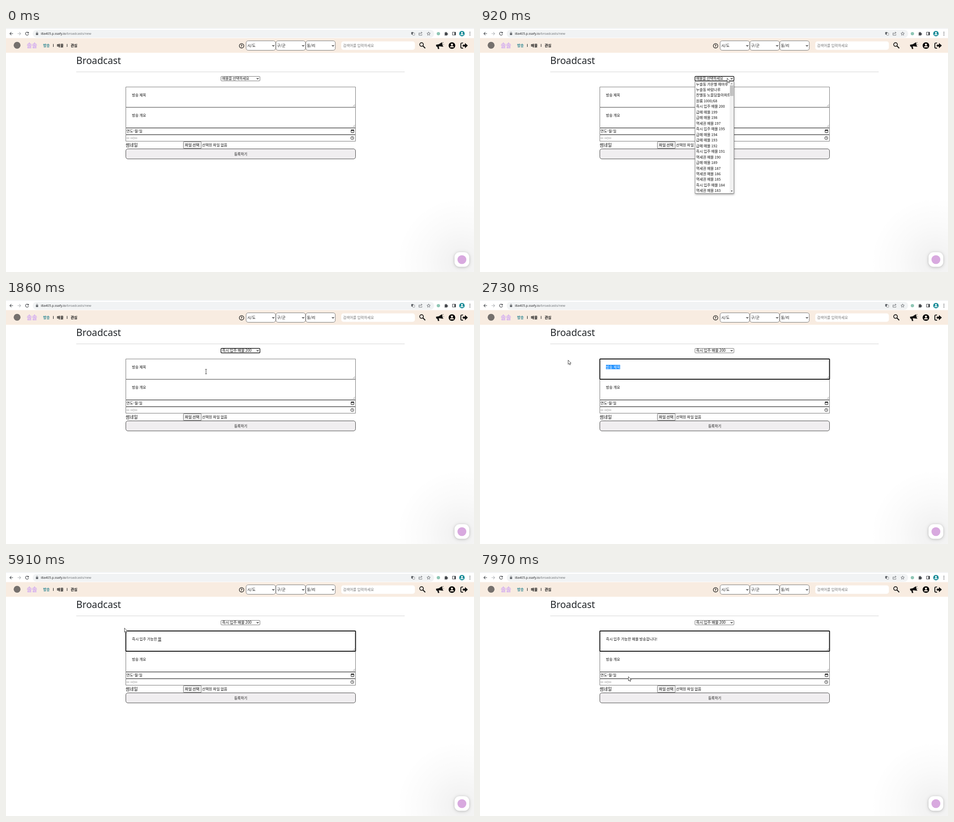
These frames come from a looping animation (1033 px wide and 542 px high, 8000 ms). An HTML page with a canvas:

```html
<!DOCTYPE html>
<html lang="ko">
<head>
<meta charset="utf-8">
<style>
html, body { margin: 0; width: 100%; height: 100%; overflow: hidden; background: #fff; }
canvas { display: block; width: 1033px; height: 542px; }
</style>
</head>
<body>
<canvas id="stage"></canvas>
<script>
const W = 1033, H = 542, LOOP = 8000, TICK = 66.4;
const KR = '"Noto Sans CJK KR", "Noto Sans CJK", sans-serif';
const UI = '"Open Sans", "Noto Sans", sans-serif';
const INK = '#111', BORDER = '#767676', BLUE = '#1e90ff';

const stage = document.getElementById('stage');
const ctx = stage.getContext('2d');
const dpr = window.devicePixelRatio || 1;
stage.width = W * dpr;
stage.height = H * dpr;

// Cursor tip by tick: [tick, x, y]
const PATH = [
  [1, 848, 418], [2, 728, 308], [3, 609, 219], [5, 598, 160], [9, 600, 112],
  [11, 600, 112], [12, 560, 111], [13, 545, 111], [18, 545, 111], [19, 518, 136],
  [20, 511, 159], [21, 508, 168], [22, 507, 174], [26, 507, 174], [27, 478, 166],
  [29, 405, 152], [31, 371, 149], [32, 345, 149], [33, 318, 149], [35, 277, 146],
  [37, 226, 138], [39, 194, 133], [41, 194, 133], [42, 230, 127], [43, 261, 124],
  [114, 261, 124], [115, 220, 140], [116, 193, 178], [117, 235, 232], [118, 290, 256],
  [119, 318, 246], [120, 327, 232]
];

// Title typing: [tick, text]; a trailing ~ marks a syllable still being composed
const TYPING = [
  [47, 'ㅈ~'], [50, '즈~'], [52, '즉~'], [55, '즈~'], [57, 'ㅈ~'], [58, '지~'], [60, '직~'], [62, '즉~'],
  [64, '즉ㅅ~'], [65, '즉시~'], [67, '즉시 '],
  [70, '즉시 ㅇ~'], [71, '즉시 이~'], [72, '즉시 입~'], [74, '즉시 입ㅈ~'], [75, '즉시 입주~'],
  [77, '즉시 입주 '], [79, '즉시 입주 가~'],
  ...steps(82, '즉시 입주 가', ['느~', '능~', '능ㅎ~', '능하~', '능한~', '능한 ㅁ~', '능한 매~', '능한 맴~']),
  [91, '즉시 입주 가능한 매무~'], [92, '즉시 입주 가능한 매물~'], [93, '즉시 입주 가능한 매물 '],
  ...steps(94, '즉시 입주 가능한 매물 ', ['ㅂ~', '바~', '방~', '방ㅅ~', '방소~', '방송~', '방송ㅎ~', '방송하~', '방송합~']),
  [104, '즉시 입주 가능한 매물 방송합ㄴ~'], [106, '즉시 입주 가능한 매물 방송합니~'],
  [107, '즉시 입주 가능한 매물 방송합닏~'], [108, '즉시 입주 가능한 매물 방송합니다~'],
  [111, '즉시 입주 가능한 매물 방송합니다!']
];

const ITEMS = [
  '누솔동 가온별 채마루', '누솔동 바람나루', '찬별동 노을담뜰아파트', '원룸 1000/68',
  ...['즉200', '급199', '급198', '역197', '즉195', '급194', '급193', '급192', '즉191', '역190',
    '급189', '역187', '역186', '역185', '즉184', '역183'].map(s =>
    ({ 즉: '즉시 입주', 급: '급매', 역: '역세권' })[s[0]] + ' 매물 ' + s.slice(1))
];

function steps(from, base, ends) {
  return ends.map((e, i) => [from + i, base + e]);
}

function text(s, x, y, size = 8.1, color = INK, weight = 500, align = 'left', family = KR) {
  ctx.font = `${weight} ${size}px ${family}`;
  ctx.textAlign = align;
  ctx.fillStyle = color;
  ctx.fillText(s, x, y);
  return ctx.measureText(s).width;
}

function box(x, y, w, h, r, fill, stroke, line = 1) {
  ctx.beginPath();
  ctx.roundRect(x, y, w, h, r);
  if (fill) { ctx.fillStyle = fill; ctx.fill(); }
  if (stroke) { ctx.strokeStyle = stroke; ctx.lineWidth = line; ctx.stroke(); }
}

function rect(x, y, w, h, fill) {
  ctx.fillStyle = fill;
  ctx.fillRect(x, y, w, h);
}

function disc(x, y, r, fill) {
  ctx.beginPath();
  ctx.arc(x, y, r, 0, Math.PI * 2);
  ctx.fillStyle = fill;
  ctx.fill();
}

function ring(x, y, r, color, line) {
  ctx.beginPath();
  ctx.arc(x, y, r, 0, Math.PI * 2);
  ctx.strokeStyle = color;
  ctx.lineWidth = line;
  ctx.stroke();
}

function stroke(d, color = INK, line = 1) {
  ctx.strokeStyle = color;
  ctx.lineWidth = line;
  ctx.stroke(new Path2D(d));
}

function fill(d, color = INK) {
  ctx.fillStyle = color;
  ctx.fill(new Path2D(d));
}

function chevron(x, y) {
  stroke(`M${x - 2.2} ${y - 1.1}l2.2 2.2 2.2-2.2`, INK, 1.2);
}

function person(x, y, r, back, front) {
  disc(x, y, r, back);
  disc(x, y - r * .28, r * .33, front);
  fill(`M${x - r * .6} ${y + r * .55}q0-${r * .42} ${r * .6}-${r * .42}t${r * .6} ${r * .42}z`, front);
}

function browserBar() {
  const gray = '#5f6368';
  rect(0, 0, W, 1, '#e4e7ea');
  box(59, 4, 886, 17.5, 8.7, '#f1f3f4');
  stroke('M15.5 12.5H8.5M11.8 9.2L8.5 12.5l3.3 3.3', '#4a4d51', 1.2);
  stroke('M25.5 12.5h7M29.2 9.2l3.3 3.3-3.3 3.3', '#b4b7ba', 1.2);
  stroke('M49 10.3A3.4 3.4 0 1 0 49.8 13.3M49.8 8.8v2.4h-2.6', '#4a4d51', 1.2);
  box(66, 11.6, 5, 4, .6, gray);
  stroke('M67 11.8v-1.3a1.5 1.5 0 0 1 3 0v1.3', gray, .9);
  const w = text('i8a405.p.ssafy.io', 77, 15.2, 7.2, '#202124', 400, 'left', UI);
  text('/broadcasts/new', 77 + w, 15.2, 7.2, '#6a6e72', 400, 'left', UI);

  box(894.5, 9, 4.6, 5.4, .6, gray);
  box(897.8, 11, 4.2, 5.2, .6, '#fff', gray, .7);
  stroke('M913.5 11h-2v5h6.5v-2M913.5 13.5q.3-3 4.5-3M916.2 8.5l2.3 2-2.3 2', gray, .9);
  stroke('M932.8 8.8l1.1 2.5 2.7.2-2 1.8.6 2.7-2.4-1.4-2.4 1.4.6-2.7-2-1.8 2.7-.2z', gray, .9);
  disc(954.4, 12.6, 3.7, '#8fc6b5');
  fill('M968.2 10.2h2v-.6a1 1 0 0 1 2 0v.6h2v2h.5a1.1 1.1 0 0 1 0 2.2h-.5v2h-6v-2.2a1 1 0 0 0 0-1.8z', '#44474b');
  box(985.5, 9.2, 7, 6.6, .5, null, '#44474b', 1.1);
  rect(989.6, 9.2, 3, 6.6, '#44474b');
  person(1006.4, 12.5, 6, '#158a96', '#fff');
  [9.4, 12.6, 15.8].forEach(y => disc(1024, y, .9, '#44474b'));
}

function siteHeader() {
  rect(0, 22.5, W, 32.5, '#f8ece1');
  disc(24.5, 38.3, 7.6, '#75706d');
  text('솔솔', 45.7, 43, 12.6, '#d2aaf0', 900);
  text('방송', 82, 41.7, 8, '#23818e', 700);
  text('매물', 112.3, 41.7, 8, INK, 700);
  text('관심', 142.7, 41.7, 8, INK, 700);
  rect(104, 35.5, 1, 6.5, INK);
  rect(134.4, 35.5, 1, 6.5, INK);

  ring(520, 39.6, 5, INK, 1.2);
  text('?', 520, 42.6, 8, INK, 700, 'center', UI);
  ['시/도', '구/군', '동/리'].forEach((s, i) => {
    const x = 530 + i * 65.9;
    box(x, 28.5, 65, 21, 4.5, '#fff', '#777');
    text(s, x + 2.4, 41.8, 8.3);
    chevron(x + 60, 39.2);
  });
  box(740, 29.7, 162.5, 18.8, 5, '#fff');
  text('검색어를 입력하세요', 744, 42, 8, '#757575');

  ring(917.2, 36.7, 4, INK, 1.7);
  stroke('M920.2 39.7l5.2 5.3', INK, 2.1);
  fill('M949 37.2l6.5-1.2 6.8-4.5 2.2 10.3-7.4-1.2-2 .5 1.4 5.1-3 .6-1.6-5.3-2 .1z');
  stroke('M964.2 33.5l.8-2M965.3 36.8l1.2-.2M964.5 40l1.2 1', INK, .9);
  person(984.3, 39, 7.3, '#000', '#f8ece1');
  stroke('M1009 33.4h-3a2 2 0 0 0-2 2v7.4a2 2 0 0 0 2 2h3', INK, 1.9);
  fill('M1008 37h5v-3.8l6.4 5.9-6.4 5.9v-3.8h-5z');
}

function grip(y) {
  stroke(`M765.8 ${y}l4.4-4.4M768.4 ${y}l1.8-1.8`, '#777', .8);
}

function form(n) {
  const open = n >= 14 && n < 26, chosen = n >= 26, focused = n >= 33;
  text('Broadcast', 155, 80.3, 21, '#212529', 500, 'left', '"Noto Sans", sans-serif');
  rect(155, 97, 725, 1, '#d3d3d3');

  const active = n >= 13 && !focused;
  box(474.5, 107.5, 86, 10, 1.5, '#fff', active ? '#111' : BORDER, active ? 1.4 : 1);
  text(chosen ? ITEMS[4] : '매물을 선택하세요', 477, 115.1, chosen ? 8.3 : 7.9);
  chevron(555.5, 112.4);

  box(264.5, 176.5, 507, 45, 0, '#fff', BORDER);
  text('방송 개요', 278, 197.2, 8);
  grip(219.8);
  box(264.5, 131, 507, 45, focused ? 1 : 0, '#fff', focused ? '#111' : BORDER, focused ? 2 : 1);
  grip(174.3);
  title(n);

  box(264.5, 222.5, 507, 14, 0, '#fff', BORDER);
  box(264.5, 237.5, 507, 14, 0, '#fff', BORDER);
  text('연도-월-일', 265.7, 232.2, 8.1);
  text('-- --:--', 266, 247, 9.3);
  box(761.8, 226.7, 6, 5.8, .5, null, INK, 1);
  rect(761.5, 226.3, 6.6, 1.9, INK);
  rect(762.8, 225.3, 1, 1.5, INK);
  rect(766, 225.3, 1, 1.5, INK);
  ring(764.3, 244.4, 3.4, INK, .9);
  stroke('M764.3 242.3v2.2l1.4 1', INK, .9);

  text('썸네일', 264, 263.6, 9.8);
  box(391.5, 252.5, 39.5, 15, 1, '#efefef', BORDER);
  text('파일 선택', 395, 262.8, 8.1);
  text('선택된 파일 없음', 432.8, 262.8, 8.1);
  box(264.5, 268.5, 507, 22.3, 4.5, n === 2 ? '#e3e1e3' : '#f0eef0', '#444');
  text('등록하기', 518, 282.7, 7.8, INK, 500, 'center');
  if (open) list(n);
}

function title(n) {
  const x = 278, y = 152.2;
  if (n < 47) {
    const w = text('방송 제목', x, y, 8);
    const left = n < 34 ? w : Math.max(0, Math.min(w, pointer(n)[0] - x));
    if (left < w) {
      rect(x + left, 144, w - left, 9.7, BLUE);
      ctx.save();
      ctx.beginPath();
      ctx.rect(x + left, 140, w - left, 16);
      ctx.clip();
      text('방송 제목', x, y, 8, '#fff');
      ctx.restore();
    }
    return;
  }
  const raw = TYPING.filter(e => e[0] <= n).pop()[1];
  const s = raw.replace('~', '');
  const w = text(s, x, y, 8.05);
  if (raw !== s) {
    const last = ctx.measureText(s.slice(-1)).width;
    rect(x + w - last, 153, last, .9, INK);
  }
}

function list(n) {
  const x = 474.5, y = 118, pitch = 12.47;
  ctx.save();
  ctx.shadowColor = 'rgba(0,0,0,.35)';
  ctx.shadowBlur = 4 * dpr;
  ctx.shadowOffsetY = 1.5 * dpr;
  rect(x, y, 86.5, 250, '#fff');
  ctx.restore();
  box(x + .3, y + .3, 85.7, 249.2, 0, null, BORDER, .9);
  const tip = pointer(n - 1)[1];
  const hot = n < 19 ? -1 : n === 20 ? 2 : Math.floor((tip - y) / pitch);
  ITEMS.forEach((s, i) => {
    const top = y + .5 + i * pitch;
    if (i === hot) rect(x + .8, top, 75.7, pitch, BLUE);
    text(s, 477, top + 9, 8.1, i === hot ? '#fff' : INK);
  });
  rect(551, y + 1, 9, 248, '#f1f1f1');
  rect(551.8, 127.5, 7.4, 23.5, '#c1c1c1');
  fill('M553.6 124.4l2-2.2 2 2.2z', '#777');
  fill('M553.6 361.2l2 2.2 2-2.2z', '#333');
}

function chatButton() {
  const haze = ctx.createRadialGradient(1006, 520, 20, 1006, 520, 145);
  haze.addColorStop(0, 'rgba(0,0,0,.05)');
  haze.addColorStop(.5, 'rgba(0,0,0,.02)');
  haze.addColorStop(1, 'rgba(0,0,0,0)');
  rect(850, 370, 183, 172, haze);
  ctx.save();
  ctx.shadowColor = 'rgba(0,0,0,.25)';
  ctx.shadowBlur = 6 * dpr;
  ctx.shadowOffsetY = dpr;
  box(990, 498, 32.5, 32.5, 11, '#fff');
  ctx.restore();
  disc(1006.3, 514.5, 9.8, '#d8a9df');
}

function pointer(n) {
  const i = PATH.findIndex(p => p[0] >= n);
  const b = PATH[i < 0 ? PATH.length - 1 : i], a = PATH[Math.max(0, i - 1)];
  if (i <= 0) return [b[1], b[2]];
  const k = (n - a[0]) / (b[0] - a[0]);
  return [a[1] + (b[1] - a[1]) * k, a[2] + (b[2] - a[2]) * k];
}

function cursor(n) {
  if (n < 1) return;
  const [x, y] = pointer(n);
  const inArea = x > 265 && x < 771 && y > 131 && y < 218;
  if (inArea && !(n >= 14 && n < 26)) {
    stroke(`M${x - 2} ${y - 5}h4M${x} ${y - 5}v10M${x - 2} ${y + 5}h4`, '#333', .9);
    return;
  }
  const d = `M${x + .5} ${y + .5}v9.4l2.1-2 1.5 3.3 1.6-.7-1.5-3.2h2.9z`;
  fill(d, '#fff');
  stroke(d, '#333', .9);
}

function draw(now) {
  const n = Math.floor((now % LOOP + 10) / TICK);
  ctx.setTransform(dpr, 0, 0, dpr, 0, 0);
  rect(0, 0, W, H, '#fff');
  browserBar();
  siteHeader();
  chatButton();
  form(n);
  cursor(n);
}

const start = performance.now();
function frame() {
  draw(performance.now() - start);
  requestAnimationFrame(frame);
}
frame();
</script>
</body>
</html>
```
